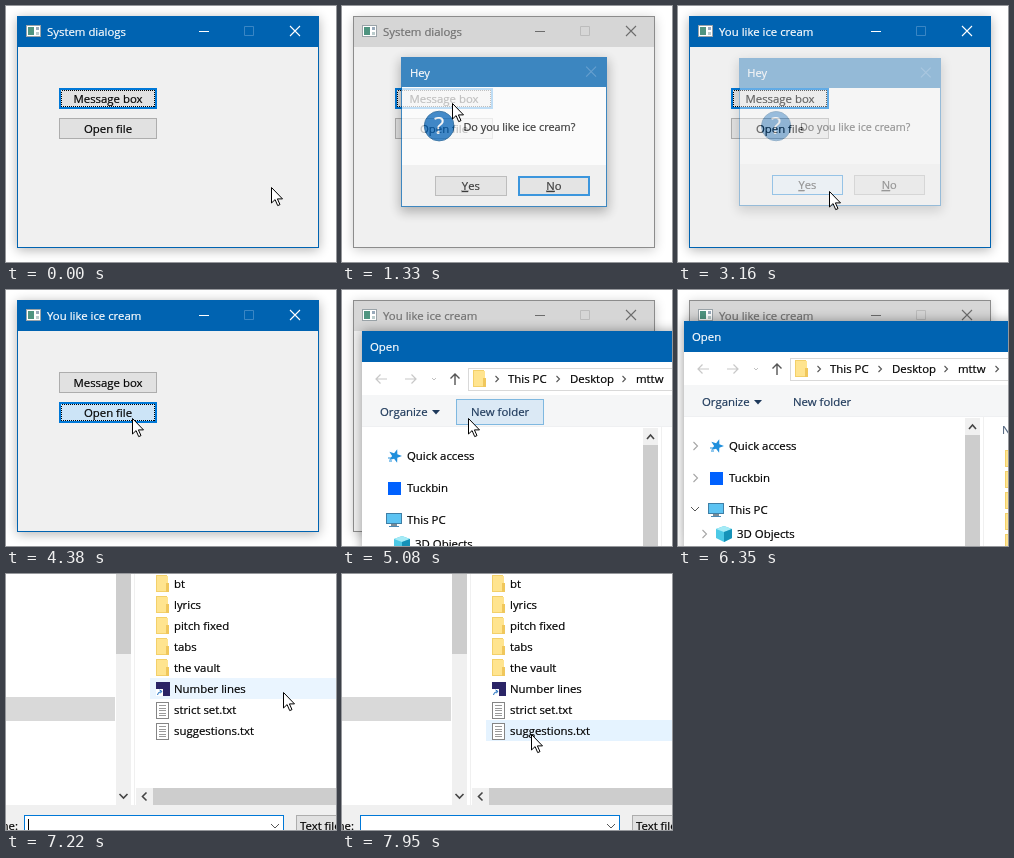
An HTML page for the animation above (8 s loop, 330x256 px).

```html
<!DOCTYPE html>
<html lang="en">
<head>
<meta charset="utf-8">
<title>System dialogs</title>
<style>
html, body { margin: 0; width: 100%; height: 100%; overflow: hidden; background: #fff; }
svg { display: block; width: 330px; height: 256px; }
text {
  font: 11.4px "Open Sans", "Noto Sans", sans-serif; white-space: pre;
  color: #000; fill: currentColor; stroke: currentColor; stroke-width: .2;
}
rect { shape-rendering: crispEdges; }
.mid { text-anchor: middle; }
.white { color: #fff; }
.line { fill: none; }
.bar { fill: #0063b1; }
.frame { fill: none; stroke: #0063b1; }
.glyph { fill: none; stroke: #fff; }
.dim { fill: none; stroke: #3a86c4; }
.off .bar { fill: #d6d6d6; }
.off .frame { stroke: #8c8c8c; }
.off .glyph { stroke: #6c6c6c; }
.off .dim { stroke: #bcbcbc; }
.off .title { color: #707070; }
.shade { opacity: .3; filter: url(#blur); }
.deep { opacity: .36; }
.off .shade { opacity: .2; }
.btn rect { fill: #e1e1e1; stroke: #adadad; }
.btn .ring, .btn .dots { fill: none; stroke: none; }
.btn.focus .ring { stroke: #0078d7; stroke-width: 2; }
.btn.focus .dots { stroke: #000; stroke-dasharray: 1 1; }
.btn.hot .face { fill: #e5f1fb; stroke: #0078d7; }
.btn.soft .face { fill: #e3ebf5; stroke: #7fa9cf; }
.btn.down .face { fill: #cce4f7; stroke: #005499; }
.tool { color: #1e395b; }
</style>
</head>
<body>
<svg id="stage" viewBox="0 0 330 256" xmlns="http://www.w3.org/2000/svg"></svg>
<script>
const LOOP = 8000;
const ROW = 21, FIRST = 138;

// Drawing helpers
const rect = (x, y, w, h, fill, more = '') =>
  `<rect x="${x}" y="${y}" width="${w}" height="${h}" fill="${fill}" ${more}/>`;
const edge = (x, y, w, h, fill, stroke, more = '') =>
  rect(x + .5, y + .5, w - 1, h - 1, fill, `stroke="${stroke}" ${more}`);
const text = (x, mid, s, more = '') => `<text x="${x}" y="${mid + 4}" ${more}>${s}</text>`;
const line = (d, stroke, width = 1) =>
  `<path d="${d}" class="line" stroke="${stroke}" stroke-width="${width}"/>`;
const cross = (x, y, cls) =>
  `<path class="${cls}" stroke-width="1.1" d="M${x - 5} ${y - 5}l10 10m0-10l-10 10"/>`;
const chevron = (x, y, color = '#555', r = 3) =>
  line(`M${x - 1.5} ${y - r}l${r} ${r}-${r} ${r}`, color, 1.1);
const down = (x, y, color = '#666', w = 1, r = 4) =>
  line(`M${x - r} ${y - r / 2}l${r} ${r} ${r}-${r}`, color, w);
const up = (x, y, color = '#444', w = 1.6) => line(`M${x - 3.5} ${y + 2}l3.5-4 3.5 4`, color, w);

const button = (id, x, y, w, h, label) => `<g id="${id}" class="btn">
  ${edge(x, y, w, h, '', '', 'class="face"')}
  ${rect(x + 1, y + 1, w - 2, h - 2, 'none', 'class="ring"')}
  ${edge(x + 2, y + 2, w - 4, h - 4, 'none', '', 'class="dots"')}
  ${text(x + w / 2, y + h / 2, label, 'class="mid"')}</g>`;

const folder = (x, y) =>
  rect(x, y - 9, 11, 17, '#f3d06a') + rect(x + 1, y - 8, 11, 15, '#ffe48f') +
  rect(x + 10, y - 1, 3, 9, '#f0c75c');
const sheet = (x, y) => {
  let s = edge(x, y - 8, 13, 17, '#fff', '#858585');
  for (let i = 0; i < 5; i++) s += rect(x + 3, y - 5 + i * 2.5, 7, 1, '#9a9a9a');
  return s;
};
const shortcut = (x, y) =>
  rect(x, y - 7, 14, 14, '#2b2466') + rect(x, y, 7, 7, '#fff') +
  line(`M${x + 1.5} ${y + 6}q0-3 4-3.5m-2-1.5l2.4 1.3-1.6 2`, '#1e6fc0');

function star(x, y) {
  let d = '';
  for (let i = 0; i < 10; i++) {
    const a = i * Math.PI / 5 - 1.25, r = i % 2 ? 2.9 : 7;
    d += `${i ? 'L' : 'M'}${x + r * Math.cos(a)} ${y + r * Math.sin(a)}`;
  }
  return `<path d="${d}z" fill="#1f8fdc"/>` +
    line(`M${x - 7} ${y + 2}h4m-3 3h3`, '#1f8fdc');
}
const computer = (x, y) =>
  edge(x, y - 7, 16, 11, '#5cc3f2', '#3f7fa6') + rect(x + 5, y + 4, 6, 2, '#7c8b95') +
  rect(x + 3, y + 6, 10, 1, '#4b89b5');
const cube = (x, y) =>
  `<path d="M${x} ${y - 5}l8-3 8 3v9l-8 4-8-4z" fill="#4cc9e6"/>
   <path d="M${x} ${y - 5}l8-3 8 3-8 3z" fill="#a5ebf6"/>
   <path d="M${x + 8} ${y - 2}l8-3v9l-8 4z" fill="#1592b8"/>`;

function mainWindow() {
  return `<g id="main">
    ${rect(11, 12, 302, 232, '#000', 'class="shade"')}
    ${rect(11, 10, 302, 232, '#f0f0f0')}
    ${rect(11, 10, 302, 31, '', 'class="bar"')}
    ${rect(11.5, 10.5, 301, 231, '', 'class="frame"')}
    ${edge(20, 19, 15, 12, '#fff', '#9aa3a8')}
    ${rect(22, 21, 6, 8, '#4f9480')}${rect(30, 21, 3, 3, '#9ab')}${rect(30, 26, 3, 3, '#bcc')}
    <text id="caption" class="white title" x="41" y="30"></text>
    <path class="glyph" d="M193 25.5h10"/>
    <path class="dim" d="M238.5 20.5h9v9h-9z"/>
    ${cross(289, 25, 'glyph')}
    ${button('ask', 53, 82, 98, 21, 'Message box')}
    ${button('browse', 53, 112, 98, 21, 'Open file')}
  </g>`;
}

function messageBox() {
  return `<g id="msg">
    ${rect(57, 53, 210, 154, '#000', 'class="shade deep"')}
    ${rect(58, 50, 208, 152, '#fff')}
    ${rect(58, 159, 208, 43, '#f0f0f0')}
    ${rect(58, 50, 208, 31, '#0063b1')}
    ${edge(58, 50, 208, 152, 'none', '#0063b1')}
    ${text(67, 66, 'Hey', 'class="white"')}
    ${cross(250, 65, 'dim')}
    <circle cx="96.5" cy="120" r="15" fill="#0b69bd" stroke="#07518f"/>
    <text x="96.5" y="128.5" class="mid white" style="font-size:24px">?</text>
    ${text(121, 121, 'Do you like ice cream?', 'style="font-size:11px"')}
    ${button('yes', 92, 170, 73, 21, '<tspan text-decoration="underline">Y</tspan>es')}
    ${button('no', 176, 170, 73, 21, '<tspan text-decoration="underline">N</tspan>o')}
  </g>`;
}

// Drawn from its own top left corner
function openDialog() {
  const W = 640, H = 470;
  const files = ['arts', 'bt', 'lyrics', 'pitch fixed', 'tabs', 'the vault',
    'Number lines', 'strict set.txt', 'suggestions.txt'];
  const list = files.map((name, i) => {
    const y = FIRST + i * ROW;
    const icon = i < 6 ? folder : i === 6 ? shortcut : sheet;
    return icon(321, y) + text(339, y, name);
  }).join('');
  return `<g id="open">
    ${rect(0, 0, W, H, '#000', 'class="shade deep"')}
    ${rect(0, 0, W, H, '#fff')}
    ${rect(0, 0, W, 31, '#0063b1')}
    ${text(8, 16, 'Open', 'class="white"')}

    ${line('M25 48h-11m4.5-4.5l-4.5 4.5 4.5 4.5', '#c8c8c8', 1.2)}
    ${line('M43 48h11m-4.5-4.5l4.5 4.5-4.5 4.5', '#c8c8c8', 1.2)}
    ${down(72, 48, '#c0c0c0', 1, 2)}
    ${line('M93 54v-11m-4.5 4.5l4.5-4.5 4.5 4.5', '#555', 1.4)}
    ${edge(106, 37, 500, 23, '#fff', '#d9d9d9')}
    ${folder(111, 48)}
    ${[135, 196, 262, 313].map(x => chevron(x, 48)).join('')}
    ${text(146, 48, 'This PC')}${text(208, 48, 'Desktop')}${text(274, 48, 'mttw')}

    ${rect(0, 64, W, 32, '#f5f6f7')}${rect(0, 95, W, 1, '#eff0f2')}
    ${edge(94, 68, 88, 26, '#dbe9f5', '#7fb8e0', 'id="newHot"')}
    ${text(18, 81, 'Organize', 'class="tool"')}
    <path d="M70 79h8l-4 4.5z" fill="#1e395b"/>
    ${text(109, 81, 'New folder', 'class="tool"')}

    ${rect(0, 113, 280, 24, '#e5f3ff', 'id="navHot"')}
    ${rect(0, 272, 280, 24, '#d9d9d9')}
    <g id="arrows">
      ${chevron(11, 125, '#a6a6a6', 4)}${chevron(11, 157, '#a6a6a6', 4)}
      ${down(11, 188, '#555')}${chevron(20, 213, '#a6a6a6', 4)}
    </g>
    ${star(33, 125)}${text(45, 125, 'Quick access')}
    ${rect(26, 151, 13, 13, '#0061fe')}${text(45, 157, 'Tuckbin')}
    ${computer(24, 188.5)}${text(45, 188.5, 'This PC')}
    ${cube(32, 213)}${text(53, 213, '3D Objects')}
    ${folder(34, 236)}${text(53, 236, 'Photos')}
    ${folder(34, 260)}${text(154, 260, 'Backup of the car', 'text-anchor="end"')}
    ${rect(32, 278, 15, 11, '#1c9be0')}${text(53, 284, 'Desktop')}

    ${rect(281, 97, 15, 283, '#f0f0f0')}${rect(281, 114, 15, 115, '#cdcdcd')}
    ${up(288.5, 106)}${down(288.5, 371, '#444', 1.6)}
    ${rect(299, 96, 1, 284, '#f0f0f0')}

    ${text(318, 109, 'Name', 'style="color:#4c607a"')}
    ${up(442, 98, '#444', 1.1)}
    ${rect(315, 0, 320, 21, '#e5f3ff', 'id="rowHot"')}
    ${list}
    ${rect(301, 363, 339, 17, '#f0f0f0')}${rect(318, 363, 300, 17, '#cdcdcd')}
    ${line('M311.5 367.5l-4 4 4 4', '#444', 1.6)}

    ${rect(0, 380, W, 90, '#f0f0f0')}
    ${text(183, 401, 'File name:', 'text-anchor="end"')}
    ${edge(189, 390, 260, 23, '#fff', '#0078d7')}
    ${down(440, 401, '#555')}
    ${rect(193, 394, 1, 15, '#000', 'id="caret"')}
    ${edge(461, 390, 150, 23, '#e1e1e1', '#adadad')}
    ${text(465, 401, 'Text files (*.txt)')}
  </g>`;
}

const stage = document.getElementById('stage');
stage.innerHTML = `
  <defs><filter id="blur" x="-20%" y="-20%" width="140%" height="140%">
    <feGaussianBlur stdDeviation="6"/></filter></defs>
  ${rect(0, 0, 330, 256, '#fff')}
  ${mainWindow()}${messageBox()}${openDialog()}
  <path id="cursor" d="M.5 .5v15.5l3.6-3.4 2.6 6 2.3-1-2.6-5.7h5.1z"
    fill="#fff" stroke="#000"/>`;
const $ = id => document.getElementById(id);

// Motion helpers: the picture advances in evenly spaced steps
const steps = (t, from, to, n) =>
  t < from ? 0 : Math.min(n, Math.floor((t - from) * (n - 1) / (to - from) + 1e-6) + 1);
const smooth = s => s * s * (3 - 2 * s);
const mix = (a, b, s) => a.map((v, i) => Math.round(v + (b[i] - v) * s));
const inside = ([px, py], x, y, w, h) => px >= x && px < x + w && py >= y && py < y + h;

const REST = [265, 181], ASK = [110, 97], YES = [152, 188], BROWSE = [126, 128];
const AWAY = [400, 100];

function pointer(t) {
  if (t < 1820) return mix(REST, ASK, smooth(steps(t, 250, 970, 7) / 7));
  if (t < 3280) {
    const k = steps(t, 1820, 2420, 6);
    return k < 5 ? mix(ASK, YES, smooth(k / 4)) : k === 5 ? [152, 190] : [151, 185];
  }
  if (t < 5330) return mix([151, 181], BROWSE, smooth(steps(t, 3780, 4380, 6) / 6));
  if (t < 6200) {
    const s = steps(t, 5470, 6200, 7) / 7, start = [132, 131], bend = [230, 190];
    return mix(mix(start, bend, s), mix(bend, [345, 104], s), s);
  }
  if (t < 7220) return AWAY;
  const s = 1 - steps(t, 7220, 7580, 4) / 4;
  return mix([345, 85], [189, 160], 1 - s * s);
}

// Distance the open dialog has been dragged up and left, per step
const DRAG = [[0, 0], [14, 10], [55, 38], [112, 80], [159, 119], [180, 155], [189, 180], [191, 190]];

function mark(id, states) {
  for (const name in states) $(id).classList.toggle(name, states[name]);
}
const show = (id, amount) => $(id).setAttribute('opacity', +amount);
const place = (id, transform) => $(id).setAttribute('transform', transform);

function render(t) {
  const p = pointer(t);
  const fadeIn = steps(t, 1090, 1570, 5), fadeOut = steps(t, 2790, 3280, 5);
  const answered = fadeOut >= 3;
  const modal = fadeIn > 0 && !answered || t >= 4520;

  // Main window
  mark('main', { off: modal });
  $('caption').textContent = answered ? 'You like ice cream' : 'System dialogs';
  const overAsk = !modal && inside(p, 53, 82, 98, 21);
  const overBrowse = !modal && inside(p, 53, 112, 98, 21);
  const chosen = t >= 4380;
  mark('ask', { focus: !chosen, hot: overAsk, down: t >= 970 && t < 1090 });
  mark('browse', { focus: chosen, hot: overBrowse, down: chosen && t < 4520 });

  // Message box
  const seen = fadeOut ? [1, 1, 1, .8, .38, 0][fadeOut] : [0, .06, .35, .75, .95, 1][fadeIn];
  show('msg', seen);
  place('msg', `translate(162 126) scale(${.96 + .04 * seen}) translate(-162 -126)`);
  const overYes = inside(p, 92, 170, 73, 21);
  mark('yes', { soft: overYes && t < 2300, hot: overYes && t >= 2300, down: fadeOut === 1 });
  $('no').querySelector('.ring').style.cssText =
    fadeOut ? '' : 'stroke:#0078d7;stroke-width:2';

  // Open dialog
  const shown = t < 4820 ? 0 : t < 4960 ? .4 : t < 5080 ? .9 : 1;
  const [dx, dy] = DRAG[steps(t, 6350, 7070, 7)];
  const shift = Math.round((1 - shown) * 10);
  const x = 20 - dx + shift, y = 41 - dy + shift;
  show('open', shown);
  place('open', `translate(${x} ${y})`);
  const q = [p[0] - x, p[1] - y];
  show('newHot', t >= 5080 && inside(q, 94, 68, 88, 26));
  show('navHot', inside(q, 0, 109, 280, 30));
  show('arrows', Math.min(1, steps(t, 5470, 6200, 7) / 4));

  const row = Math.floor((q[1] - FIRST + 11) / ROW);
  const over = t >= 7220 && row >= 0 && row < 9;
  $('rowHot').setAttribute('y', FIRST - 11 + row * ROW);
  show('rowHot', !over ? 0 : row < 8 ? .8 : t < 7830 ? .4 : t < 7950 ? .7 : 1);
  show('caret', t >= 7220 && t < 7830);

  place('cursor', `translate(${p[0]} ${p[1]})`);
}

const began = performance.now();
function frame() {
  render((performance.now() - began) % LOOP);
  requestAnimationFrame(frame);
}
render(0);
requestAnimationFrame(frame);
</script>
</body>
</html>
```
